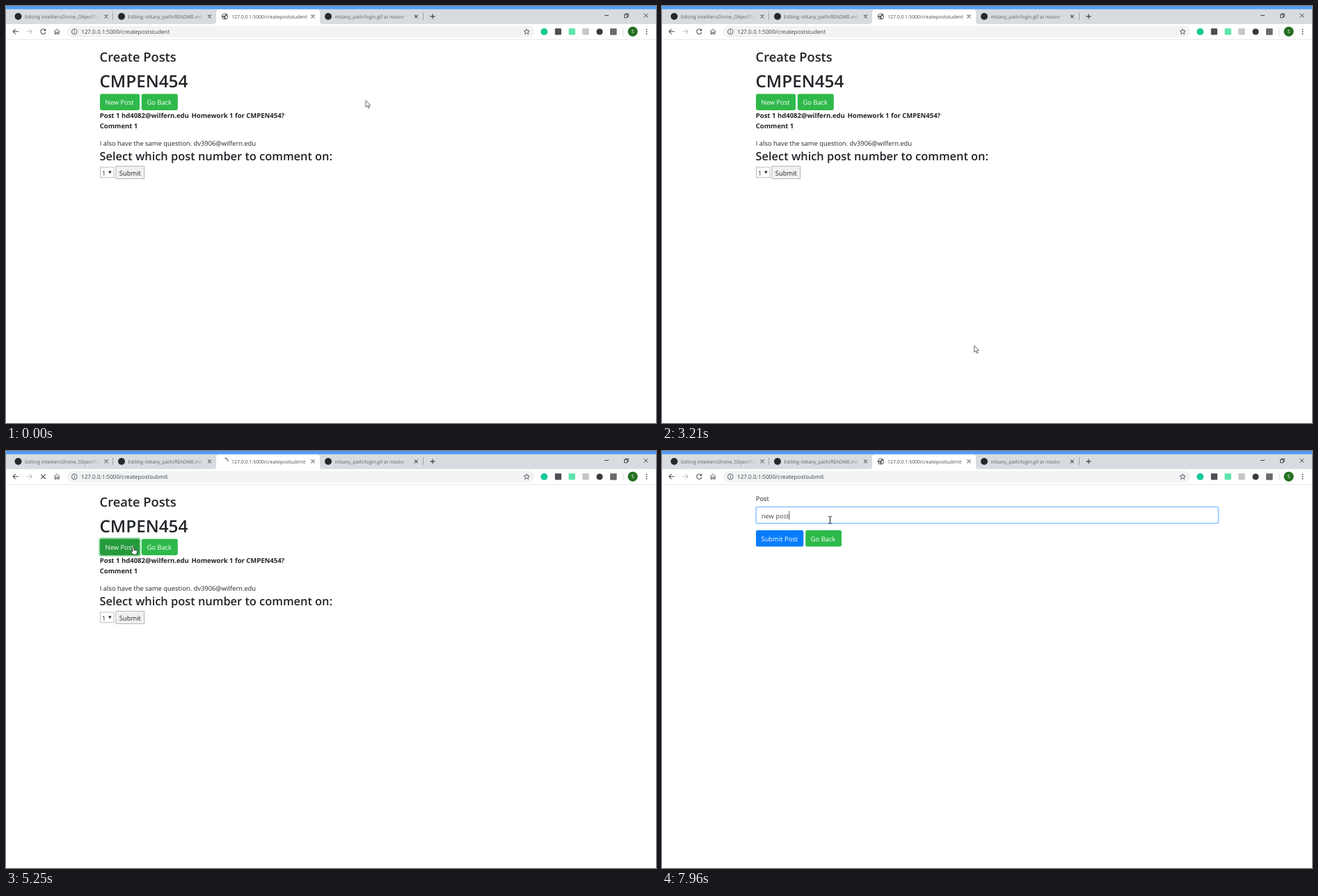
Write an HTML page that moves like this. It is 934 px wide and 600 px high and loops after 8 s.

```html
<!DOCTYPE html>
<html lang="en">
<head>
<meta charset="utf-8">
<title>Create Posts</title>
<style>
  html, body { margin: 0; width: 100%; height: 100%; overflow: hidden; background: #fff; }
  svg { display: block; width: 100vw; height: 100vh; }
  text { font-family: "Open Sans", "Noto Sans", sans-serif; font-size: 9.4px; fill: #212529;
         text-rendering: geometricPrecision; white-space: pre; }
  .tab { font-size: 6.95px; fill: #5f6368; }
  .bold { font-size: 9.5px; font-weight: 700; }
  .head { font-weight: 600; }
  .btn text { fill: #fff; }
  .line { fill: none; stroke: #4c5054; stroke-width: 1.1; }
</style>
</head>
<body>
<svg viewBox="0 0 934 600" preserveAspectRatio="none">
  <defs>
    <linearGradient id="fade">
      <stop offset="0" stop-color="#d8dce1" stop-opacity="0"/>
      <stop offset="1" stop-color="#d8dce1"/>
    </linearGradient>
    <clipPath id="clip1"><rect x="20" y="5" width="114" height="20"/></clipPath>
    <clipPath id="clip2"><rect x="170" y="5" width="114" height="20"/></clipPath>
    <clipPath id="clip4"><rect x="466" y="5" width="114" height="20"/></clipPath>
  </defs>

  <rect width="934" height="600" fill="#fff"/>
  <rect width="934" height="26" fill="#d8dce1"/>
  <rect width="934" height="4.6" fill="#4f9cf3"/>

  <!-- tabs -->
  <path d="M298 26Q302 26 302 22V9Q302 5 306 5H447Q451 5 451 9V22Q451 26 455 26Z" fill="#fff"/>
  <path d="M153.5 9.5V20M599.5 9.5V20" stroke="#90959b" stroke-width=".8"/>
  <g fill="#25292e">
    <circle cx="17.5" cy="15" r="5"/><circle cx="166" cy="15" r="5"/><circle cx="463" cy="15" r="5"/>
  </g>
  <g clip-path="url(#clip1)"><text class="tab" x="27" y="17.5">Editing IntelAeroDrone_ObjectTrac</text></g>
  <g clip-path="url(#clip2)"><text class="tab" x="175.3" y="17.5">Editing nittany_path/README.md</text></g>
  <g clip-path="url(#clip4)"><text class="tab" x="472.5" y="17.5">nittany_path/login.gif at master ·</text></g>
  <g fill="url(#fade)">
    <rect x="120" y="8" width="15" height="14"/><rect x="272" y="8" width="13" height="14"/>
    <rect x="566" y="8" width="15" height="14"/>
  </g>
  <g id="globe">
    <circle cx="314.5" cy="15" r="4.6" fill="#5b6065"/>
    <path d="M311 13.2Q313 10.8 315.6 11.4L314.6 13.6 312.4 14.6ZM315.6 14.6L318.2 13.6Q318.6 16.4 316.6 18.2L315.2 16.8ZM311 16L313.4 16.6 313.6 18.6Q311.6 18 311 16Z" fill="#fff"/>
  </g>
  <path id="spinner" d="M314.5 10.4A4.6 4.6 0 0 1 319.1 15" class="line"/>
  <text id="tabTitle" class="tab" x="324" y="17.5" style="fill:#474b50"></text>
  <path id="closers" class="line"/>
  <path d="M609.5 15H616.5M613 11.5V18.5" class="line" style="stroke-width:1.3"/>
  <g class="line" style="stroke-width:.9;stroke:#333">
    <path d="M860 13.5H866M916.5 10.8L922.5 16.8M922.5 10.8L916.5 16.8"/>
    <path d="M888.5 12.5H892.8V16.8H888.5ZM890 12.5V11H894.3V15.3H892.8"/>
  </g>

  <!-- toolbar -->
  <rect x="88" y="28.8" width="671.5" height="16.4" rx="8.2" fill="#f1f3f4"/>
  <path d="M0 48.4H934" stroke="#dfe1e4" stroke-width=".8"/>
  <path d="M18 36.8H10.2M13.7 33.2L10.1 36.8 13.7 40.4" class="line"/>
  <path d="M29.5 36.8H37.3M33.8 33.2L37.4 36.8 33.8 40.4" class="line" style="stroke:#bfc2c5"/>
  <g id="reload">
    <path d="M56.4 34.4A3.7 3.7 0 1 0 57.1 37.6" class="line"/>
    <path d="M57.4 32.6V36H54Z" fill="#4c5054"/>
  </g>
  <path id="stop" d="M50.3 33.6L56.7 40M56.7 33.6L50.3 40" class="line"/>
  <path d="M69.3 37L73.3 33.2 77.3 37M70.5 36.4V40.4H72.3V37.8H74.3V40.4H76.1V36.4" class="line" style="stroke-width:1"/>
  <circle cx="98.3" cy="37" r="3.9" class="line" style="stroke-width:.9"/>
  <path d="M98.3 36.4V39.2M98.3 34.6V35.5" class="line" style="stroke-width:.9"/>
  <text id="url" x="108" y="40" style="font-size:8.15px;fill:#3f4347"></text>
  <path id="star" class="line" style="stroke-width:.9"/>
  <circle cx="773.3" cy="37" r="5" fill="#19c997"/>
  <rect x="788.8" y="32.2" width="9.2" height="9.2" rx="1" fill="#4d5054"/>
  <rect x="808.5" y="32.2" width="9.4" height="9.4" rx="1" fill="#5ee3ab"/>
  <rect x="828.3" y="32.2" width="9.4" height="9.4" rx="1" fill="#c6c6c6"/>
  <circle cx="853" cy="37" r="4.6" fill="#3b3b3b"/>
  <rect x="868" y="32.2" width="9.6" height="9.6" rx="1" fill="#6b6b6b"/>
  <path d="M886.8 31.5V42.5" stroke="#d5d8db" stroke-width=".8"/>
  <circle cx="900.6" cy="36.8" r="7.1" fill="#23701f"/>
  <text x="900.6" y="39.4" text-anchor="middle" style="font-size:7px;fill:#fff">S</text>
  <g fill="#4c5054"><circle cx="920.5" cy="33.6" r=".95"/><circle cx="920.5" cy="36.8" r=".95"/><circle cx="920.5" cy="40" r=".95"/></g>

  <!-- list of posts -->
  <g id="posts">
    <text class="head" x="134.6" y="80.3" style="font-size:18.3px">Create Posts</text>
    <text class="head" x="134.4" y="116.8" style="font-size:24.3px">CMPEN454</text>
    <text class="bold" x="134.8" y="161.3">Post 1</text>
    <text class="bold" x="166" y="161.3">hd4082@wilfern.edu</text>
    <text class="bold" x="266.5" y="161.3">Homework 1 for CMPEN454?</text>
    <text class="bold" x="134.8" y="176.3">Comment 1</text>
    <text x="134.8" y="201">I also have the same question. dv3906@wilfern.edu</text>
    <text class="head" x="134.6" y="221.8" style="font-size:16.4px">Select which post number to comment on:</text>
    <rect x="135.4" y="232" width="19.6" height="14.8" fill="#fff" stroke="#aaa" stroke-width=".8"/>
    <text x="138" y="243.5">1</text>
    <path d="M147 237.4H151.6L149.3 241.4Z" fill="#222"/>
    <rect x="157.9" y="230.6" width="40.8" height="17.8" fill="#f0f0f0" stroke="#a8a8a8" stroke-width=".8"/>
    <text x="162.8" y="243.5">Submit</text>
  </g>

  <!-- new post form -->
  <g id="form">
    <text x="134.8" y="72.2">Post</text>
    <rect id="glow" x="133.8" y="79.3" width="667" height="26" rx="3.4" fill="#bfdeff"/>
    <rect id="field" x="135.4" y="80.8" width="663.8" height="23" rx="2.2" fill="#fff" stroke-width=".9"/>
    <text id="typed" x="142.8" y="96.6" style="fill:#495057"></text>
    <path id="caret" stroke="#333" stroke-width=".8"/>
  </g>

  <!-- pointers, hot spot at 0,0 -->
  <path id="arrow" d="M0 0V9.4L2.2 7.4 3.8 11 5.3 10.3 3.8 6.9H6.7Z" fill="#fff" stroke="#444" stroke-width=".8"/>
  <path id="hand" d="M-1 .6Q0-.6 1 .6V4.4L4.4 5Q5.6 5.3 5.5 6.6L4.8 11H-.4L-3.4 7Q-3.4 5.4-1 6.6Z" fill="#fff" stroke="#222" stroke-width=".8"/>
  <path id="beam" d="M-2.6-5H-.8L0-4.5.8-5H2.6M0-4.5V4.5M-2.6 5H-.8L0 4.5.8 5H2.6" fill="none" stroke="#222" stroke-width="1"/>
</svg>
<script>
const LOOP = 8000, CLICK = 5080, LOADED = 5560, FOCUS = 6000;
const TYPE_FROM = 7080, TYPE_STEP = 105, MESSAGE = 'new post';
const $ = id => document.getElementById(id);
const show = (el, on) => el.setAttribute('display', on ? 'inline' : 'none');

function make(tag, attrs, parent) {
  const el = document.createElementNS('http://www.w3.org/2000/svg', tag);
  for (const k in attrs) el.setAttribute(k, attrs[k]);
  return parent.appendChild(el);
}

const GREEN = ['#2fb94a', '#249a3b'], BLUE = ['#087dfb', '#0069d9'];

function button(page, label, x, y, w, [base, dark]) {
  const g = make('g', { class: 'btn' }, $(page));
  const ring = make('rect', { x: x - 1.8, y: y - 1.8, width: w + 3.6, height: 27.2, rx: 3.8, fill: '#9bdca8' }, g);
  const box = make('rect', { x, y, width: w, height: 23.6, rx: 2.4 }, g);
  make('text', { x: x + 7.6, y: y + 16 }, g).textContent = label;
  return { page, x, y, w, base, dark, ring, box };
}

const buttons = [
  button('posts', 'New Post', 135, 126.4, 57, GREEN),
  button('posts', 'Go Back', 194.8, 126.4, 52, GREEN),
  button('form', 'Submit Post', 135, 114, 68.3, BLUE),
  button('form', 'Go Back', 206.2, 114, 51.8, GREEN)
];
$('form').append($('caret'));

$('closers').setAttribute('d', [144, 292.5, 441, 589.3]
  .map(x => `M${x - 2.4} 12.6l4.8 4.8m0-4.8l-4.8 4.8`).join(''));
$('star').setAttribute('d', 'M' + Array.from({ length: 10 }, (_, i) => {
  const r = i % 2 ? 1.9 : 4.2, a = i * Math.PI / 5;
  return `${748.2 + r * Math.sin(a)} ${37.1 - r * Math.cos(a)}`;
}).join('L') + 'Z');

// pointer path: time, x, y
const path = [
  [0, 517, 136], [600, 517, 136], [1700, 535, 158], [2250, 535, 158],
  [2720, 505, 588], [3040, 470, 550], [3800, 305, 75], [4110, 300, 67],
  [4300, 299, 68], [4820, 183, 138], [LOADED, 183, 138],
  [5900, 241.5, 99.2], [LOOP, 241.5, 99.2]
];

function pointer(t) {
  const i = path.findIndex(p => p[0] > t), a = path[i - 1], b = path[i];
  const u = (t - a[0]) / (b[0] - a[0]), e = u * u * (3 - 2 * u);
  return [a[1] + (b[1] - a[1]) * e, a[2] + (b[2] - a[2]) * e];
}

function draw(t) {
  const [px, py] = pointer(t);
  const page = t < LOADED ? 'posts' : 'form';
  const loading = t >= CLICK && t < LOADED;
  const address = '127.0.0.1:5000/createpost' + (t < CLICK ? 'student' : 'submit');

  show($('posts'), page === 'posts');
  show($('form'), page === 'form');
  $('url').textContent = $('tabTitle').textContent = address;
  show($('globe'), !loading);
  show($('reload'), !loading);
  show($('spinner'), loading);
  show($('stop'), loading);
  $('spinner').setAttribute('transform', `rotate(${(5250 - t) * 0.36} 314.5 15)`);

  let over = false;
  buttons.forEach((b, i) => {
    const hit = b.page === page && px > b.x && px < b.x + b.w && py > b.y && py < b.y + 23.6;
    over = over || hit;
    b.box.setAttribute('fill', hit ? b.dark : b.base);
    show(b.ring, i === 0 && loading);
  });

  const focus = Math.max(0, Math.min(1, (t - FOCUS) / 120));
  $('glow').setAttribute('opacity', focus);
  $('field').setAttribute('stroke', focus ? '#80bdff' : '#ced4da');
  const count = Math.max(0, Math.min(MESSAGE.length, Math.floor((t - TYPE_FROM) / TYPE_STEP) + 1));
  const typed = $('typed');
  typed.textContent = MESSAGE.slice(0, count);
  const cx = 143.2 + (count && page === 'form' ? typed.getComputedTextLength() : 0);
  $('caret').setAttribute('d', `M${cx} 86.2V98.8`);
  show($('caret'), t >= FOCUS && (count > 0 || (t - FOCUS) % 1000 < 500));

  const inField = page === 'form' && py > 80 && py < 104;
  const kind = over ? 'hand' : inField ? 'beam' : 'arrow';
  for (const id of ['arrow', 'hand', 'beam']) {
    show($(id), id === kind);
    $(id).setAttribute('transform', `translate(${px} ${py})`);
  }
}

const start = performance.now();
function tick() {
  draw((performance.now() - start) % LOOP);
  requestAnimationFrame(tick);
}
tick();
</script>
</body>
</html>
```
